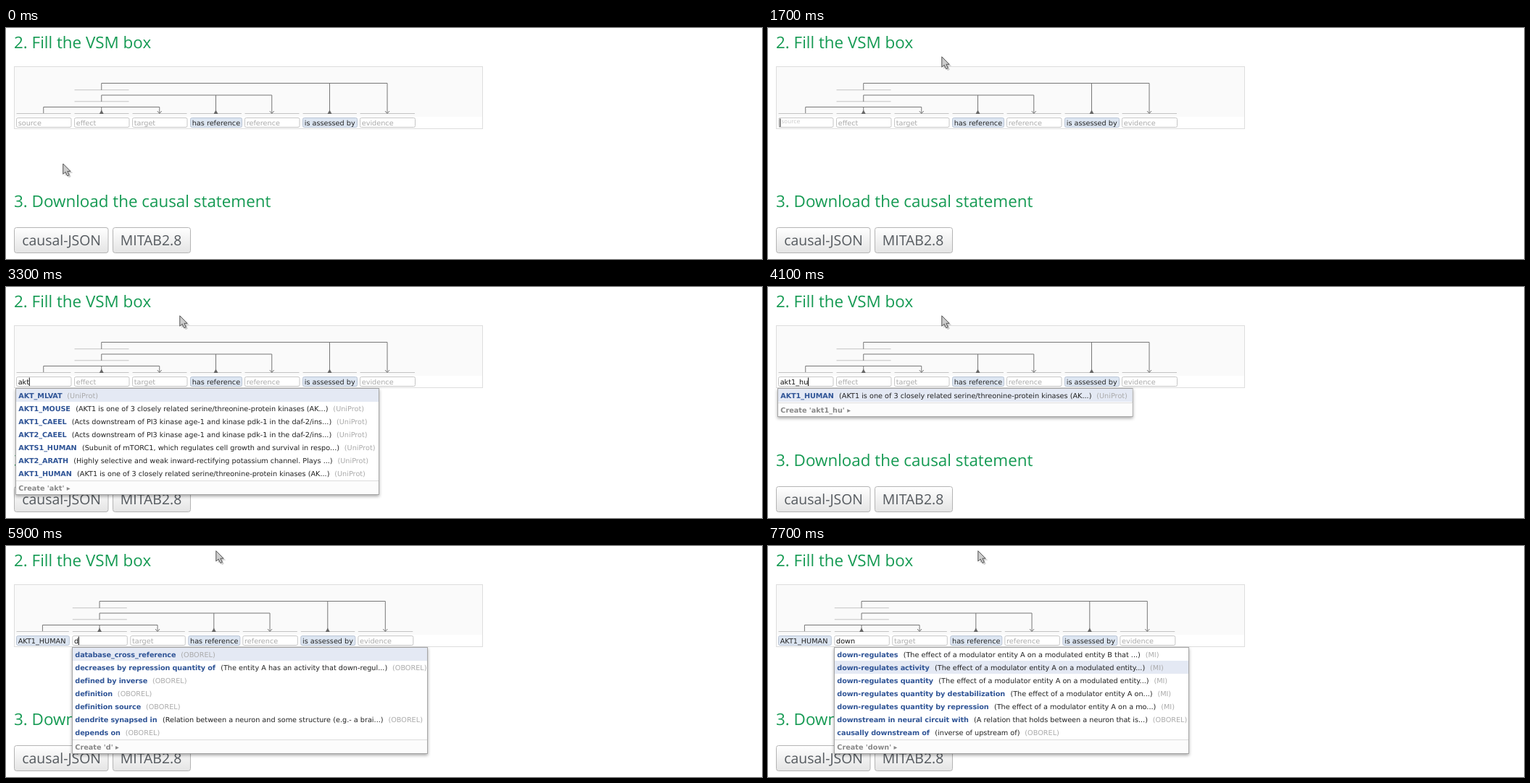
An HTML page that plays this animation: 1043 px wide and 320 px high, repeating every 8 s.

```html
<!DOCTYPE html>
<html lang="en">
<head>
<meta charset="utf-8">
<title>Fill the VSM box</title>
<style>
  html, body { margin: 0; width: 100%; height: 100%; overflow: hidden; background: #fff; }
  svg { display: block; width: 1043px; height: 320px; }
  text { font: 9.7px "DejaVu Sans", sans-serif; fill: #222; text-rendering: geometricPrecision; white-space: pre; }
  .head { font: 22.4px "Open Sans", sans-serif; fill: #159a53; }
  .btn { font: 19.4px "Open Sans", sans-serif; fill: #555a5f; }
  .hint { fill: #aaa; }
  .small { font-size: 7.9px; fill: #ccc; }
  .typed { fill: #111; }
  .name { font-weight: bold; fill: #2f5496; letter-spacing: -.1px; }
  .from { fill: #aaa; }
  .create { font-weight: bold; fill: #888; }
  .wire { fill: none; stroke: #777; }
  .stub { stroke: #c2c2c2; }
  .drop { filter: drop-shadow(0 2px 2px rgba(0, 0, 0, .35)); }
</style>
</head>
<body>
<svg viewBox="0 0 1043 320">
  <defs>
    <linearGradient id="face" x2="0" y2="1">
      <stop stop-color="#fff"/><stop offset="1" stop-color="#e4e4e4"/>
    </linearGradient>
  </defs>
  <text class="head" x="11" y="28">2. Fill the VSM box</text>
  <text class="head" x="11" y="248">3. Download the causal statement</text>
  <g fill="url(#face)" stroke="#b4b4b4">
    <rect x="11.5" y="276.5" width="129.5" height="35" rx="3"/>
    <rect x="147.5" y="276.5" width="107" height="35" rx="3"/>
  </g>
  <text class="btn" x="22.3" y="301">causal-JSON</text>
  <text class="btn" x="157.8" y="301">MITAB2.8</text>
  <rect x="11.5" y="53.5" width="646" height="86" fill="#fff" stroke="#ddd"/>
  <rect x="12" y="54" width="645" height="69" fill="#fafafa"/>
  <g id="box"></g>
  <g id="list"></g>
  <g id="pointer">
    <path d="M2.5 2.5V17L5.5 14.3L8 19.5L11 18L9 13H13.5Z" fill="#000" opacity=".18"/>
    <path d="M0 0V14.4L3.4 11.4L5.9 17L8.5 15.8L6.1 10.5H10.3Z" fill="#ccc" stroke="#555" stroke-linejoin="round"/>
  </g>
</svg>
<script>
const LOOP = 8000, TICK = 100;
const $ = id => document.getElementById(id);

const akt1 = '(AKT1 is one of 3 closely related serine/threonine-protein kinases (AK...)';
const daf2 = '(Acts downstream of PI3 kinase age-1 and kinase pdk-1 in the daf-2/ins...)';
const modulator = tail => `(The effect of a modulator entity A on a ${tail}...)`;
const neural = ['downstream in neural circuit with', '(A relation that holds between a neuron that is...)'];
const causal = ['causally downstream of', '(inverse of upstream of)'];

// Each list: left and right edge, default origin, rows of [name, description, origin]
const lists = {
  akt: [13.5, 514.5, 'UniProt', [
    ['AKT_MLVAT'],
    ['AKT1_MOUSE', akt1],
    ['AKT1_CAEEL', daf2],
    ['AKT2_CAEEL', daf2],
    ['AKTS1_HUMAN', '(Subunit of mTORC1, which regulates cell growth and survival in respo...)'],
    ['AKT2_ARATH', '(Highly selective and weak inward-rectifying potassium channel. Plays ...)'],
    ['AKT1_HUMAN', akt1]]],
  human: [13.5, 503, 'UniProt', [['AKT1_HUMAN', akt1]]],
  d: [91.5, 581.5, 'OBOREL', [
    ['database_cross_reference'],
    ['decreases by repression quantity of', '(The entity A has an activity that down-regul...)'],
    ['defined by inverse'],
    ['definition'],
    ['definition source'],
    ['dendrite synapsed in', '(Relation between a neuron and some structure (e.g.- a brai...)'],
    ['depends on']]],
  dow: [91.5, 606.5, 'OBOREL', [
    neural,
    causal,
    ['causally downstream of or within', '(inverse of causally upstream of or within)'],
    ['immediately causally downstream of'],
    ['is downstream of sequence of', '(x is downstream of the sequence of y iff either (1)...)'],
    ['is immediately downstream of sequence of', '(x is immediately downstream of the sequ...)']]],
  down: [91.5, 580.5, 'MI', [
    ['down-regulates', modulator('modulated entity B that ')],
    ['down-regulates activity', modulator('modulated entity')],
    ['down-regulates quantity', modulator('modulated entity')],
    ['down-regulates quantity by destabilization', '(The effect of a modulator entity A on...)'],
    ['down-regulates quantity by repression', modulator('mo')],
    [...neural, 'OBOREL'],
    [...causal, 'OBOREL']]]
};

// Changes that take effect at each time
const steps = [
  [0, { focus: -1, value: '', caret: true, list: '', pick: 0, filled: false }],
  [900, { focus: 0 }],
  [2500, { caret: false }],
  [2900, { value: 'a', caret: true }],
  [3000, { list: 'akt' }],
  [3100, { value: 'ak' }],
  [3200, { value: 'akt' }],
  [3500, { value: 'akt1' }],
  [3800, { value: 'akt1_' }],
  [4000, { value: 'akt1_h' }],
  [4100, { value: 'akt1_hu', list: 'human' }],
  [4200, { value: 'akt1_hum' }],
  [4300, { value: 'akt1_huma' }],
  [4400, { value: 'akt1_human' }],
  [5300, { value: '', list: '', filled: true, focus: -1 }],
  [5400, { focus: 1 }],
  [5900, { value: 'd', list: 'd' }],
  [6000, { value: 'do' }],
  [6200, { value: 'dow', list: 'dow' }],
  [6300, { value: 'down', list: 'down' }],
  [6900, { caret: false }],
  [7700, { pick: 1 }]
];

const path = [[0, 78.7, 188], [700, 58, 123], [900, 58, 123], [1700, 239.8, 39.8], [4200, 239.8, 39.8], [4700, 289.8, 6.7], [LOOP, 289.8, 6.7]];

const labels = ['source', 'effect', 'target', 'has reference', 'reference', 'is assessed by', 'evidence'];
const lefts = [14.5, 94.5, 174.5, 254.5, 329.5, 409.5, 488.5];
const widths = [75.5, 75.5, 75.5, 71, 75.5, 75, 76];

const text = (cls, x, y, s) => `<text class="${cls}" x="${x}" y="${y}">${s}</text>`;

function connector(y, from, fromY, mid, to) {
  return `<path class="wire" d="M${from} ${fromY}V${y}H${to}V118M${mid} ${y}V115M${to - 3} 115L${to} 118.5L${to + 3} 115"/>
    <path d="M${mid - 3} 119L${mid} 113.5L${mid + 3} 119Z" fill="#666"/>`;
}

function drawBox({ focus, value, filled }) {
  const shift = filled ? -2.7 : 0;
  const left = lefts.map((x, i) => i ? x + shift : x);
  const width = widths.map((w, i) => i ? w : w + shift);
  const mid = left.map((x, i) => x + width[i] / 2 - .5);
  const stub = (i, y) => `<path class="stub" d="M${left[i]} ${y}h${width[i] - .5}"/>`;
  let out = stub(1, 85.8) + stub(1, 101.8);
  labels.forEach((label, i) => {
    const chip = i === 3 || i === 5 || (i === 0 && filled);
    const x = left[i] + 2.2;
    out += stub(i, 118.5) + `<rect x="${left[i]}" y="124.5" width="${width[i]}" height="13" rx="2"
      fill="${chip ? '#dde6f2' : '#fff'}" stroke="${chip ? '#b9c4d4' : '#c6c6c6'}"/>`;
    if (chip) out += text('', x, 134.8, i ? label : 'AKT1_HUMAN');
    else if (i !== focus) out += text('hint', x, 134.8, label);
    else out += (value ? '' : text('small', x + 1.5, 131.5, label)) +
      `<text id="typed" class="typed" x="${x}" y="134.8">${value}</text>`;
  });
  return out + connector(109.5, mid[0], 118, mid[1], mid[2]) +
    connector(93, mid[1], 102, mid[3], mid[4]) +
    connector(76.5, mid[1], 86, mid[5], mid[6]);
}

function drawList({ list, value, pick }) {
  if (!list) return '';
  const [left, right, origin, rows] = lists[list];
  const pitch = 17.93, w = right - left, x = left + 3.8;
  const line = Math.floor(143 + pitch * rows.length) + .5;
  let out = `<rect class="drop" x="${left}" y="140.5" width="${w}" height="${line - 121.5}" fill="#fff" stroke="#a6a6a6"/>
    <rect x="${left + .5}" y="${141 + pitch * pick}" width="${w - 1}" height="18" fill="#e4e9f4"/>
    <rect x="${left + .5}" y="${line}" width="${w - 1}" height="18" fill="#fcfcfc"/>
    <path d="M${left + .5} ${line}h${w - 1}" stroke="#ddd"/>`;
  rows.forEach(([name, about, from = origin], i) => {
    out += `<text x="${x}" y="${154.4 + pitch * i}"><tspan class="name">${name}</tspan>` +
      (about ? `<tspan dx="7.3">${about}</tspan>` : '') +
      `<tspan class="from" dx="6.8">(${from})</tspan></text>`;
  });
  return out + text('create', x, line + 13, `Create '${value}' ▸`);
}

function placeCaret(state) {
  const typed = $('typed');
  if (!typed || !state.caret) return;
  const x = +typed.getAttribute('x') + (state.value ? typed.getComputedTextLength() + .2 : 0);
  typed.insertAdjacentHTML('afterend', `<path d="M${x} 125.5V137" stroke="#222" stroke-width="1.1"/>`);
}

function pointerAt(t) {
  const i = path.findIndex(p => p[0] > t);
  const [t0, x0, y0] = path[i - 1], [t1, x1, y1] = path[i];
  const u = (t - t0) / (t1 - t0), k = u * u * (3 - 2 * u);
  return [x0 + (x1 - x0) * k, y0 + (y1 - y0) * k];
}

let shown = '';
function render(now) {
  const t = Math.floor(now % LOOP / TICK) * TICK;
  const state = Object.assign({}, ...steps.filter(s => s[0] <= t).map(s => s[1]));
  const key = JSON.stringify(state);
  if (key !== shown) {
    shown = key;
    $('box').innerHTML = drawBox(state);
    $('list').innerHTML = drawList(state);
    placeCaret(state);
  }
  $('pointer').setAttribute('transform', `translate(${pointerAt(t)})`);
}

const start = performance.now();
function frame() {
  render(performance.now() - start);
  requestAnimationFrame(frame);
}
frame();
</script>
</body>
</html>
```
